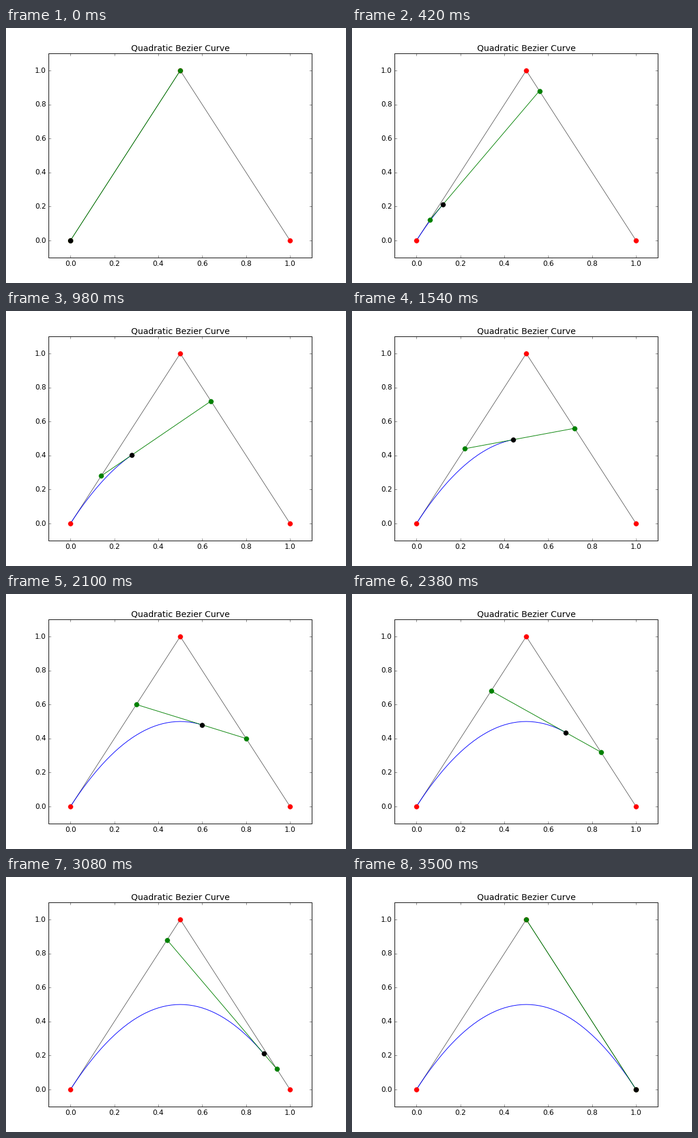
These frames come from a looping animation (576 px wide and 432 px high, 3570 ms). A matplotlib script:

```python
import numpy as np
import matplotlib.pyplot as plt
from matplotlib.animation import FuncAnimation

STEPS = 50
INTERVAL = 70

plt.style.use("classic")
plt.rcParams["savefig.dpi"] = "figure"

START, CONTROL, END = np.array([[0.0, 0.0], [0.5, 1.0], [1.0, 0.0]])


def lerp(a, b, t):
    return a + (b - a) * t


def bezier(t):
    return lerp(lerp(START, CONTROL, t), lerp(CONTROL, END, t), t)


def add_dots(color, zorder):
    return ax.plot([], [], "o", color=color, markersize=8,
                   markeredgecolor=color, markeredgewidth=0.5,
                   zorder=zorder)[0]


def set_points(line, points):
    line.set_data(*np.transpose(points))


fig = plt.figure(figsize=(8, 6), dpi=72, facecolor="white")
ax = fig.add_subplot(111)
ax.set_xlim(-0.1, 1.1)
ax.set_ylim(-0.1, 1.1)
ticks = np.linspace(0, 1, 6)
ax.set_xticks(ticks)
ax.set_yticks(ticks)
ax.set_title("Quadratic Bezier Curve")

# Control polygon, traced curve and moving segment
for a, b in ((START, CONTROL), (CONTROL, END)):
    ax.plot(*np.transpose([a, b]), color="0.4", linewidth=1, zorder=2)
curve, = ax.plot([], [], color="blue", linewidth=1, zorder=3)
segment, = ax.plot([], [], color="green", linewidth=1, zorder=4)

anchors = add_dots("red", 5)
set_points(anchors, [START, CONTROL, END])
handles = add_dots("green", 6)
tip = add_dots("black", 7)


def update(i):
    t = i / STEPS
    ends = [lerp(START, CONTROL, t), lerp(CONTROL, END, t)]
    set_points(segment, ends)
    set_points(handles, ends)
    set_points(curve, [bezier(k / STEPS) for k in range(i + 1)])
    set_points(tip, [bezier(t)])
    return curve, segment, handles, tip


anim = FuncAnimation(fig, update, frames=STEPS + 1, interval=INTERVAL,
                     init_func=lambda: update(0), repeat=True,
                     repeat_delay=0, blit=False)
plt.show()
```
